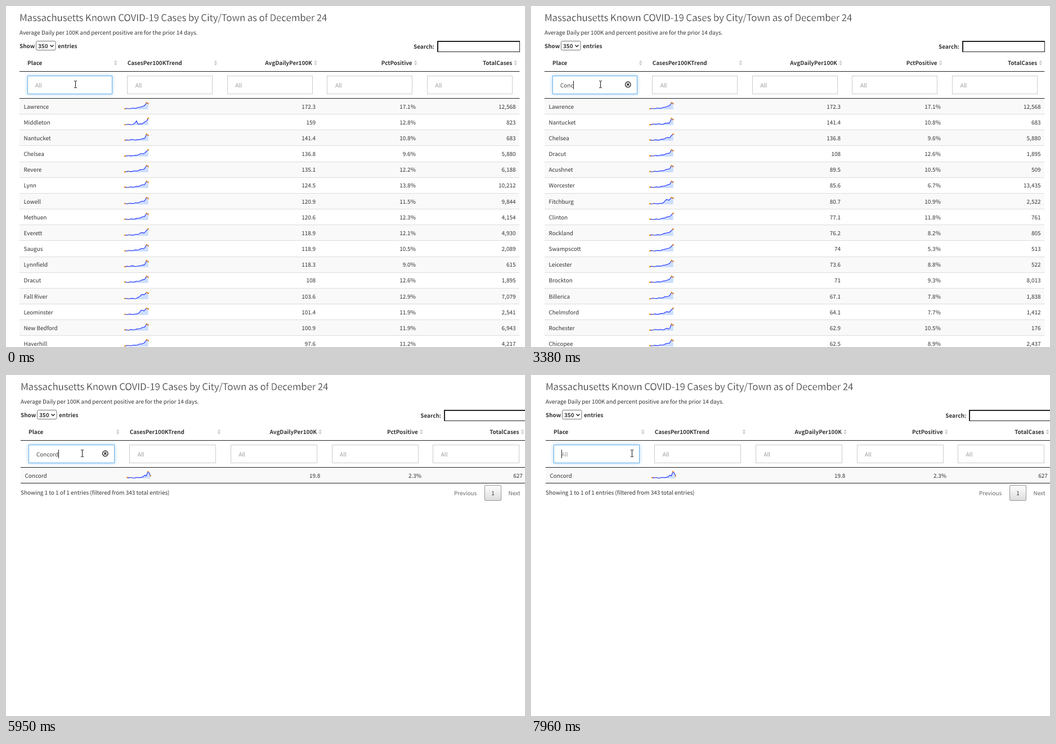
Animation of 922x607 px, one loop 8 s. Source, as an HTML page:

```html
<!DOCTYPE html>
<html lang="en">
<head>
<meta charset="utf-8">
<title>Filtered table</title>
<style>
  html, body { margin: 0; width: 100%; height: 100%; overflow: hidden; background: #fff; }
  svg { display: block; width: 922px; height: 607px; }
  text {
    font: 9.95px "Noto Sans CJK JP", "Noto Sans CJK SC", "Noto Sans CJK", "Open Sans", sans-serif;
    fill: #333; white-space: pre; text-rendering: geometricPrecision;
  }
  .bold { font-weight: 700; }
  .title { font-size: 17px; letter-spacing: -.18px; stroke: #fff; stroke-width: .35px; }
  .end { text-anchor: end; }
  .mid { text-anchor: middle; }
  .hint { fill: #999; }
  .muted { fill: #666; }
  .typed { fill: #444; }
  .box { fill: #fff; stroke: #ccc; }
  .glow { fill: #fff; stroke: #66afe9; filter: drop-shadow(0 0 3px rgba(102, 175, 233, .6)); }
</style>
</head>
<body>
<svg id="stage" viewBox="0 0 922 607">
  <defs>
    <linearGradient id="button" x2="0" y2="1">
      <stop stop-color="#fff"/><stop offset="1" stop-color="#dcdcdc"/>
    </linearGradient>
  </defs>
</svg>
<script>
const LOOP = 8000, ROW = 28.17, TOP = 164.4;
const WIDE = { left: 24.5, pitch: 177.65 };
const WIDER = { left: 26.5, pitch: 179.7 };
const HEADS = ['Place', 'CasesPer100KTrend', 'AvgDailyPer100K', 'PctPositive', 'TotalCases'];

// place | daily | positive | total | trend shape
const TOWNS = `Lawrence|172.3|17.1%|12,568|dip
Middleton|159|12.8%|823|spike
Nantucket|141.4|10.8%|683|late
Chelsea|136.8|9.6%|5,880|rise
Revere|135.1|12.2%|6,188|dip
Lynn|124.5|13.8%|10,212|dip
Lowell|120.9|11.5%|9,844|dip
Methuen|120.6|12.3%|4,154|dip
Everett|118.9|12.1%|4,930|rise
Saugus|118.9|10.5%|2,089|dip
Lynnfield|118.3|9.0%|615|late
Dracut|108|12.6%|1,895|dip
Fall River|103.6|12.9%|7,079|hump
Leominster|101.4|11.9%|2,541|hump
New Bedford|100.9|11.9%|6,943|dip
Haverhill|97.6|11.2%|4,217|dip
Acushnet|89.5|10.5%|509|dip
Worcester|85.6|6.7%|13,435|dip
Fitchburg|80.7|10.9%|2,522|hump
Clinton|77.1|11.8%|761|rise
Rockland|76.2|8.2%|805|rise
Swampscott|74|5.3%|513|rise
Leicester|73.6|8.8%|522|dip
Brockton|71|9.3%|8,013|dip
Billerica|67.1|7.8%|1,838|dip
Chelmsford|64.1|7.7%|1,412|rise
Rochester|62.9|10.5%|176|late
Chicopee|62.5|8.9%|2,437|dip
Concord|19.8|2.3%|627|peak`.split('\n').map(line => line.split('|'));

const TRENDS = {
  dip: [[0, .06], [.35, .12], [.55, .2], [.75, .42], [.84, .48], [.93, 1], [1, .85]],
  rise: [[0, .06], [.4, .1], [.6, .25], [.7, .42], [.84, .44], [.93, .8], [1, 1]],
  late: [[0, .04], [.3, .15], [.55, .1], [.75, .3], [.84, .25], [.93, 1], [1, .8]],
  spike: [[0, .05], [.36, .06], [.42, .2], [.5, .65], [.56, .1], [.7, .12], [.85, .42], [.93, .6], [1, 1]],
  hump: [[0, .05], [.5, .08], [.6, .3], [.72, .7], [.82, .62], [.93, 1], [1, .9]],
  peak: [[0, .1], [.3, .03], [.5, .1], [.68, .15], [.76, .5], [.82, .35], [.89, 1], [.94, .85], [1, .35]]
};

const stage = document.getElementById('stage');

function add(parent, tag, attrs, content = '') {
  const node = document.createElementNS('http://www.w3.org/2000/svg', tag);
  for (const key in attrs) node.setAttribute(key, attrs[key]);
  node.textContent = content;
  return parent.appendChild(node);
}
const label = (parent, x, y, content, kind = '') => add(parent, 'text', { x, y, class: kind }, content);
const bar = (parent, x, y, width, height, fill) => add(parent, 'rect', { x, y, width, height, fill });
const path = (parent, d, attrs) => add(parent, 'path', { d, fill: 'none', ...attrs });

function valueAt(points, u) {
  const k = Math.max(1, points.findIndex(p => p[0] >= u));
  const [a, b] = [points[k - 1], points[k]];
  return a[1] + (b[1] - a[1]) * (u - a[0]) / (b[0] - a[0]);
}

function sparkline(parent, x, mid, shape, seed) {
  const bottom = mid + 5.5, steps = 28, line = [];
  let high = 0;
  for (let i = 0; i <= steps; i++) {
    const u = i / steps;
    const wobble = u < .88 ? .035 * Math.sin(i * .9 + seed * 2.3) : 0;
    const v = valueAt(TRENDS[shape], u) + wobble;
    line.push([x + 1 + u * 41.5, bottom - .5 - v * 11.5]);
    if (line[i][1] < line[high][1]) high = i;
  }
  const d = 'M' + line.map(p => p.map(n => n.toFixed(2))).join('L');
  path(parent, `${d}V${bottom}H${x + 1}Z`, { fill: '#cdf' });
  path(parent, d, { stroke: '#1a2cff', 'stroke-width': 1.1 });
  for (const i of [0, 4, high, steps]) {
    add(parent, 'circle', { cx: line[i][0], cy: line[i][1], r: i === 4 ? .8 : 1.3, fill: '#f08a1c' });
  }
}

function drawTop(g, { left, pitch }) {
  const right = left + pitch * 5;
  label(g, left - .5, 27, 'Massachusetts Known COVID-19 Cases by City/Town as of December 24', 'title');
  label(g, left - .5, 51, 'Average Daily per 100K and percent positive are for the prior 14 days.');
  label(g, left - .5, 75, 'Show', 'bold');
  add(g, 'rect', { x: left + 29, y: 62.5, width: 34.5, height: 16, rx: 2, fill: '#fff', stroke: '#767676' });
  label(g, left + 32.5, 75, '350', 'bold');
  path(g, `M${left + 54} 69.5l3 3 3-3`, { stroke: '#222', 'stroke-width': 1.5 });
  label(g, left + 67.5, 75, 'entries', 'bold');
  label(g, right - 152, 76, 'Search:', 'bold end');
  const boxLeft = Math.round(right - 147);
  bar(g, boxLeft, 62, 147, 20, '#222');
  bar(g, boxLeft + 2, 64, 144, 17, '#fff');
}

function drawHead(g, { left, pitch }) {
  HEADS.forEach((name, i) => {
    const start = left + i * pitch, end = start + pitch;
    if (i < 2) label(g, start + 13.5, 105, name, 'bold');
    else label(g, end - 13.5, 105, name, 'bold end');
    path(g, `M${end - 10.3} 100.4l2.8-4 2.8 4zm0 1.6l2.8 4 2.8-4z`, { fill: '#ccc' });
    if (!i) return;
    add(g, 'rect', { x: Math.round(start + 13) + .5, y: 124.5, width: Math.round(pitch - 27), height: 32, class: 'box' });
    label(g, start + 27.5, 145, 'All', 'hint');
  });
  bar(g, left - .5, 116, pitch * 5, 1, '#222');
}

function drawRows(g, { left, pitch }, rows) {
  rows.forEach((town, i) => {
    const y = Math.floor(TOP + i * ROW), base = Math.round(182.6 + i * ROW);
    if (i % 2 === 0) bar(g, left - .5, y, pitch * 5, 28.5, '#f9f9f9');
    bar(g, left - .5, y, pitch * 5, 1, i ? '#ddd' : '#222');
    label(g, left + 7, base, town[0]);
    sparkline(g, left + pitch + 8, base - 4.5, town[4], town[0].length + i);
    for (let c = 1; c < 4; c++) label(g, left + pitch * (c + 2) - 7.3, base, town[c], 'end');
  });
}

function drawPager(g, { left, pitch }) {
  bar(g, left - .5, 192, pitch * 5, 1, '#222');
  label(g, left - .5, 213, 'Showing 1 to 1 of 1 entries (filtered from 343 total entries)');
  label(g, 796, 214, 'Previous', 'muted');
  add(g, 'rect', { x: 850.5, y: 196.5, width: 29, height: 27, rx: 1.5, fill: 'url(#button)', stroke: '#979797' });
  label(g, 865, 214, '1', 'mid');
  label(g, 892.5, 214, 'Next', 'muted');
}

function makeView(layout, rows, paged) {
  const g = add(stage, 'g', {});
  drawTop(g, layout);
  drawHead(g, layout);
  drawRows(g, layout, rows);
  if (paged) drawPager(g, layout);
  return g;
}

const withC = TOWNS.filter(t => /c/i.test(t[0]) && !/Lem|Leom|Concord/.test(t[0]));
const views = [
  makeView(WIDE, TOWNS.slice(0, 16)),
  makeView(WIDE, withC.slice(0, 16)),
  makeView(WIDER, TOWNS.slice(-1), true)
];

// The focused filter box sits above every view.
const filter = add(stage, 'g', {});
const plainBox = add(filter, 'rect', { x: 38.5, y: 124.5, height: 32, class: 'box' });
const glowBox = add(filter, 'rect', { x: 38.5, y: 124.5, height: 32, class: 'glow' });
const hint = label(filter, 52, 145, 'All', 'hint');
const typed = label(filter, 52, 145, '', 'typed');
const caret = bar(filter, 52, 133, 1, 15, '#222');
const clear = add(filter, 'g', {});
add(clear, 'circle', { r: 4.8, fill: '#fff', stroke: '#222', 'stroke-width': 1.3 });
path(clear, 'M-2-2L2 2M2-2L-2 2', { stroke: '#222', 'stroke-width': 1.6 });

const beam = path(stage, 'M-2.5-6H-.7L0-5.5.7-6H2.5M0-5.5V5.5M-2.5 6H-.7L0 5.5.7 6H2.5', { stroke: '#111' });
const arrow = path(stage, 'M0 0V12L2.7 9.5 4.7 14 6.8 13.1 4.9 8.8H8.5Z',
  { fill: '#fff', stroke: '#111', 'stroke-width': .9 });

const KEYS = [2000, 2510, 2920, 3380, 3840, 4250, 4630];
const CARET_ON = [[220, 730], [1240, 1800], [2000, 5160], [5670, 6190], [6720, 7270], [7790, LOOP]];
const CLEARED = 7790;

const show = (node, on) => node.style.display = on ? '' : 'none';
const move = (node, x, y) => node.setAttribute('transform', `translate(${x} ${y})`);

function render(t) {
  const current = t < 2260 ? 0 : t < 3430 ? 1 : 2;
  views.forEach((view, i) => show(view, i === current));

  const wider = current === 2;
  const width = wider ? 152 : 150;
  move(filter, wider ? 2 : 0, 0);
  plainBox.setAttribute('width', width);
  glowBox.setAttribute('width', width);
  glowBox.style.opacity = t > CLEARED && t < 7960 ? .5 + .5 * Math.abs(t - 7875) / 85 : 1;

  const count = t < CLEARED ? KEYS.filter(k => t >= k).length : 0;
  const text = 'Concord'.slice(0, count);
  if (typed.textContent !== text) typed.textContent = text;
  show(hint, !count);
  show(clear, count > 0);
  move(clear, width + 22.3, 139.8);
  caret.setAttribute('x', Math.floor(52 + (count ? typed.getComputedTextLength() : 0)));
  show(caret, CARET_ON.some(([from, to]) => t >= from && t < to));

  const step = Math.floor((t - 5850) / 49.2) + 1;
  const x = Math.round(123 + 55.5 * Math.min(1, Math.max(0, step / 14)));
  const pointing = x > 170 && t < 7830;
  show(beam, !pointing);
  show(arrow, pointing);
  move(beam, x + .5, 139.5);
  move(arrow, x - .5, 138.5);
}

const start = performance.now();
function tick() {
  render((performance.now() - start) % LOOP);
  requestAnimationFrame(tick);
}
tick();
</script>
</body>
</html>
```
